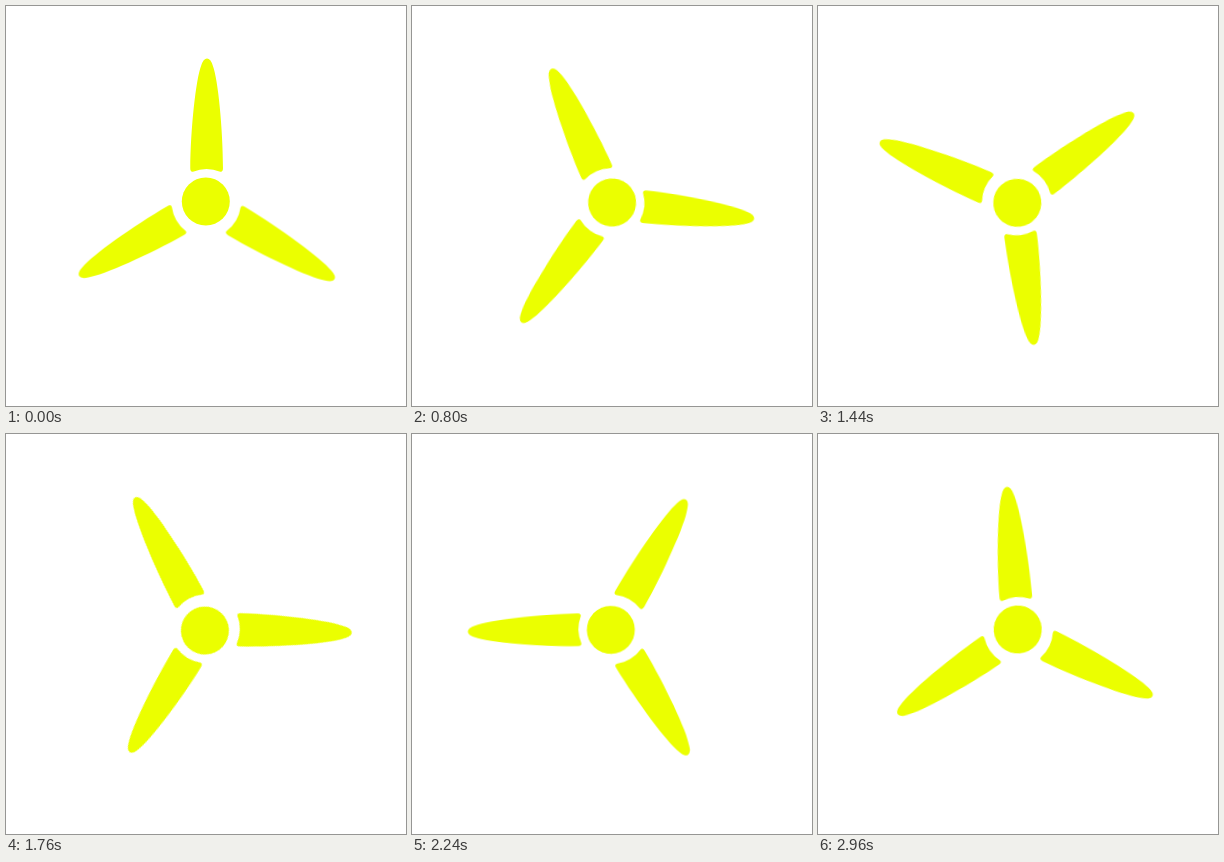
An HTML page that plays this animation: 400 by 400 pixels, repeating every 3 s.

```html
<!DOCTYPE html>
<html lang="en">
<head>
<meta charset="utf-8">
<title>Spinning rotor</title>
<style>
  html, body {
    margin: 0;
    width: 100%;
    height: 100%;
    overflow: hidden;
    background: #fff;
  }
  svg {
    display: block;
    width: 100vw;
    height: 100vh;
    fill: #ebff00;
  }
  /* 25 poses a second; the 1 ms lead keeps step edges clear of rounding */
  .rotor {
    transform-origin: 199.5px 196.15px;
    animation: spin 3s steps(75) -1ms infinite;
  }
  @keyframes spin {
    to { transform: rotate(360deg); }
  }
</style>
</head>
<body>
<svg viewBox="0 0 400 400">
  <defs>
    <path id="blade" d="M-16.2-36 C-16-75-11-125-5.8-138.5 Q-3.6-145.8 0-145.8
      Q3.6-145.8 5.8-138.5 C11-125 16-75 16.2-36
      Q16.2-32 13.5-32.6 Q0-38-13.5-32.6 Q-16.2-32-16.2-36Z"/>
  </defs>
  <g class="rotor">
    <circle cx="199.8" cy="195.5" r="24"/>
    <!-- hand-drawn look: each blade differs a little in length and seat -->
    <g transform="translate(200.8 198.3) rotate(.2)">
      <use href="#blade" transform="translate(-.3 0) scale(1.01 1)"/>
      <use href="#blade" transform="rotate(120.5) translate(-.7 3.1) scale(1.02 1.037)"/>
      <use href="#blade" transform="rotate(240) translate(1.3 1.5) scale(1.03 1.015)"/>
    </g>
  </g>
</svg>
</body>
</html>
```
